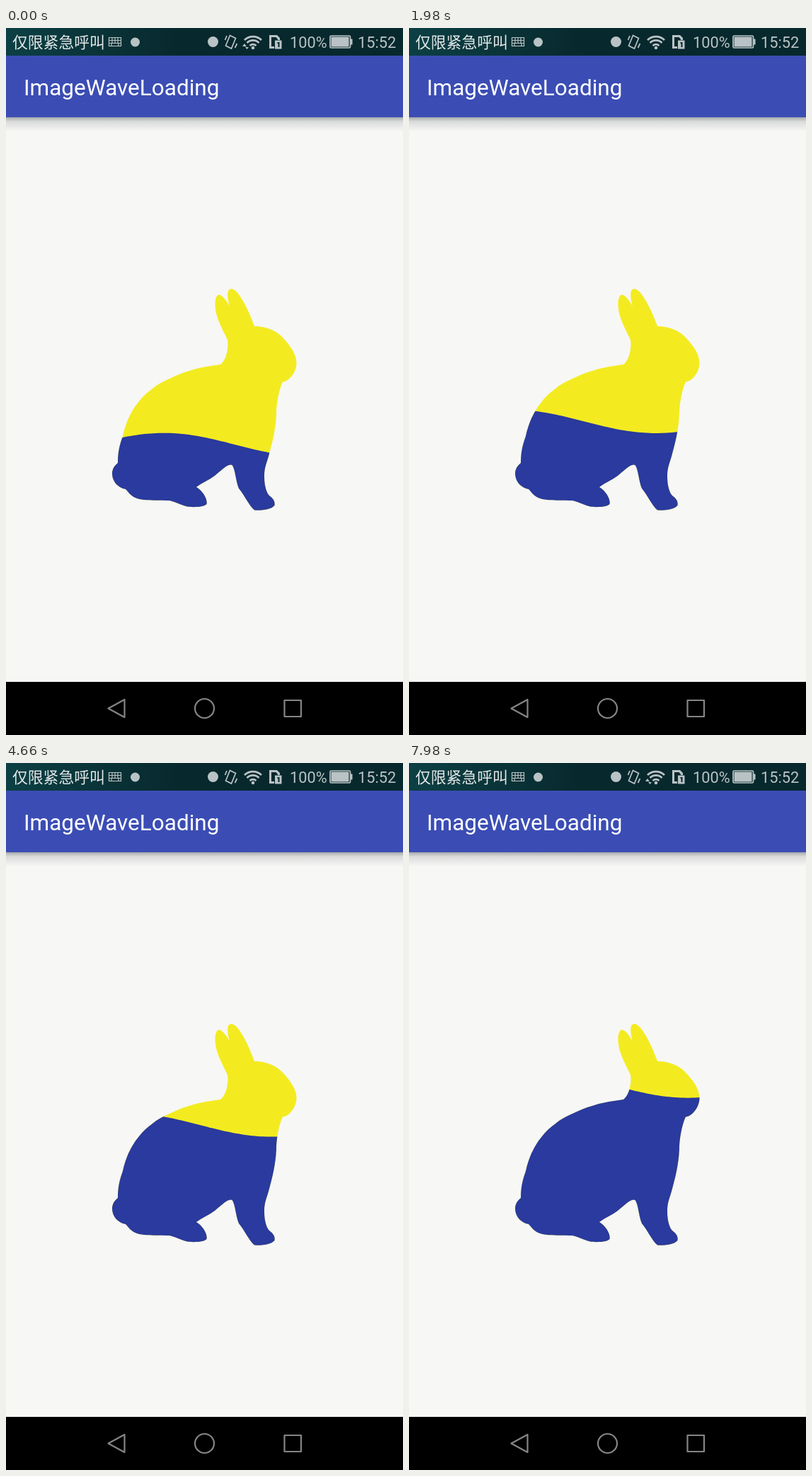
Write an HTML page that moves like this. It is 561 px wide and 998 px high and loops after 8000 ms.

```html
<!DOCTYPE html>
<html lang="zh">
<head>
<meta charset="utf-8">
<title>ImageWaveLoading</title>
<style>
  html, body { margin: 0; width: 100%; height: 100%; overflow: hidden; background: #f7f7f5; }
  svg { display: block; width: 100vw; height: 100vh; }
  text { font-family: Roboto, "Noto Sans", sans-serif; }
  .status { font-size: 21.8px; fill: #b9c3c5; }
  .carrier { font-family: "Noto Sans CJK SC", "Noto Sans CJK", sans-serif; fill: #e4e9ea; }
  .line { fill: none; stroke: #b9c3c5; stroke-width: 1.7; }
  .nav { fill: none; stroke: #858585; stroke-width: 2.2; stroke-linejoin: round; }
</style>
</head>
<body>
<svg viewBox="0 0 561 998">
  <defs>
    <linearGradient id="shade" x2="0" y2="1">
      <stop offset="0" stop-color="#a5aaaa"/>
      <stop offset=".3" stop-color="#d9dbda"/>
      <stop offset="1" stop-color="#f7f7f5"/>
    </linearGradient>
    <linearGradient id="statusBar">
      <stop offset="0" stop-color="#0c4044"/>
      <stop offset=".45" stop-color="#07282d"/>
    </linearGradient>
    <clipPath id="rabbit">
      <path d="M313 440C303 420 295.500 406 295.500 390C295.500 381 298 376.500 301.500 376.500C306 377.500 312 385 316 393
        C314 386 310.500 370 317 368.500C327 366 342 396 351 421C368 421 384 428 392 438
        C402 449 411 461 410.500 474C410 486 400 499 391 499.500C386 510 382 530 382 545
        C381 568 376 586 372 601C368 616 365 620 365 633C365 648 369 657 372 660
        C380 666 380 670 379.500 674C374 681 356 681 351 680.500C343 674 337 659 329 650
        C325 641 324 624 320 617.500C315 613 304 625 295 632C287 638 277 642 269 648
        C279 654 285 666 283.500 672C280 677 260 676.500 256 675.500C246 673 238 668 230 667
        C212 666 198 668 185 664C176 661 173 655 169 651C158 649 150 640 150 629
        C150 622 154 617 158 614C158 595 162 585 165 576C167 566 170 558 173 551
        C178 541 182 534 188 527C193 520 200 514 207 509C214 503 222 499 231 495
        C250 486 266 481 283 478L303 475C310 470 315 455 313 440Z"/>
    </clipPath>
  </defs>

  <rect width="561" height="998" fill="#f7f7f5"/>
  <rect y="126" width="561" height="20" fill="url(#shade)"/>
  <rect y="38" width="561" height="88" fill="#3b4db4"/>
  <text x="25" y="95" font-size="31.5" fill="#fff">ImageWaveLoading</text>

  <rect width="561" height="39" fill="url(#statusBar)"/>
  <text class="status carrier" x="9" y="28">仅限紧急呼叫</text>
  <g class="line">
    <path d="M145.500 13.500h17v12h-17zM145.500 17.500h17M145.500 21.500h17M150 14v8M154 14v8M158 14v8M149 21v4M159 21v4" stroke-width="1.2"/>
    <path d="M316.500 10.500l8 4-6 14.500-8-4zM312 11l-2.500 6M326.500 22l-3 6"/>
    <path d="M337 17a17 17 0 0 1 24 0M340.500 21a12 12 0 0 1 17 0M344.500 25a6.500 6.500 0 0 1 9 0" stroke-width="2.7"/>
  </g>
  <g fill="#b9c3c5">
    <circle cx="182.500" cy="20" r="6.500"/>
    <circle cx="292.500" cy="19.500" r="7.500"/>
    <circle cx="349" cy="28" r="2.300"/>
    <path id="traffic" d="M334 26l3-4 3 4zM338 27h5l-2.500 3z"/>
    <path fill-rule="evenodd" d="M372 10h11l4 4v3h-3v-1l-2.500-3H375v13h4v3h-7zM380 17.500h9.500v12H380zM383.500 20v2h1v5h2v-7z"/>
    <path d="M459.500 12.500h25v14h-25zM487 15.500h2.500v8H487z"/>
  </g>
  <rect class="line" x="458" y="11" width="28.500" height="17" rx="1.500" stroke-width="1.300"/>
  <text class="status" x="401" y="28">100%</text>
  <text class="status" x="497" y="28">15:52</text>

  <g clip-path="url(#rabbit)">
    <rect x="140" y="360" width="280" height="330" fill="#f3eb20"/>
    <path id="wave" fill="#2a3a9e"/>
  </g>

  <rect y="923" width="561" height="75" fill="#000"/>
  <g class="nav">
    <path d="M144.500 960.500L167.500 948v25z"/>
    <circle cx="280.500" cy="960.500" r="13.500"/>
    <rect x="393.500" y="949" width="23.500" height="23"/>
  </g>
</svg>
<script>
  const LOOP = 8000;
  const LENGTH = 404, AMPLITUDE = 16.5;   // wave shape in pixels
  const SWAY = 39, SWAY_PERIOD = 3600;    // sideways rocking of the crest
  const wave = document.getElementById('wave');
  const traffic = document.getElementById('traffic');

  function wavePath(t) {
    const level = 588.2 - 0.01654 * t;
    const crest = 184 + SWAY * Math.cos(2 * Math.PI * t / SWAY_PERIOD);
    let d = 'M140 690';
    for (let x = 140; x <= 420; x += 4) {
      const y = level - AMPLITUDE * Math.cos(2 * Math.PI * (x - crest) / LENGTH);
      d += `L${x} ${y.toFixed(2)}`;
    }
    return d + 'V690Z';
  }

  function draw(now) {
    const t = now % LOOP;
    wave.setAttribute('d', wavePath(t));
    traffic.style.visibility = t < 1000 || t >= 5700 ? 'visible' : 'hidden';
    requestAnimationFrame(draw);
  }
  draw(0);
</script>
</body>
</html>
```
